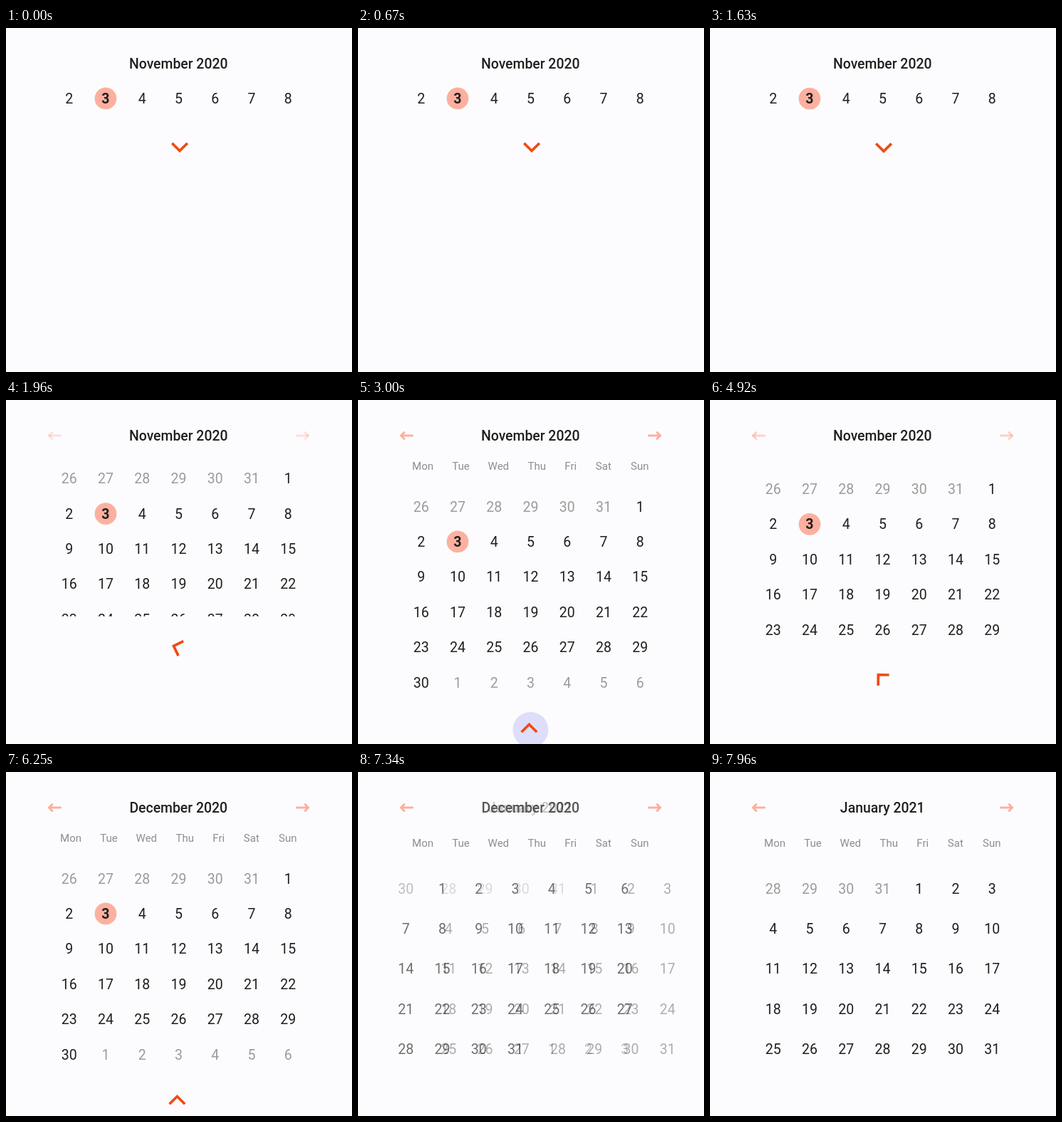
These frames come from a looping animation (486 by 483 pixels, 8 s). An HTML page with a canvas:

```html
<!DOCTYPE html>
<html lang="en">
<head>
<meta charset="utf-8">
<title>Calendar</title>
<style>
  html, body { margin: 0; width: 100%; height: 100%; overflow: hidden; background: #fcfcff; }
  canvas { display: block; }
</style>
</head>
<body>
<canvas id="stage" width="486" height="483"></canvas>
<script>
const ctx = document.getElementById('stage').getContext('2d');
const LOOP = 8000;
const INK = '#1f1f1c', MUTED = '#9b9b9b', LABEL = '#8c8c95';
const ACCENT = '#ee4b14', SOFT = '#fdb09f', RIPPLE = '#dedefb';
const FONT = 'Roboto, Arial, sans-serif';

const DAYS = [['Mon', 91], ['Tue', 144.5], ['Wed', 197.3], ['Thu', 251.3],
              ['Fri', 298.7], ['Sat', 344.8], ['Sun', 395.8]];
const NOV = { title: 'November 2020', lead: 6, before: 31, days: 30, rows: 6, top: 149.5, pitch: 49.4, today: 3 };
const DEC = { title: 'December 2020', lead: 1, before: 30, days: 31, rows: 5, top: 163.5, pitch: 56.4 };
const JAN = { title: 'January 2021', lead: 4, before: 31, days: 31, rows: 5, top: 163.5, pitch: 56.4 };

const ramp = (t, from, to) => Math.min(1, Math.max(0, (t - from) / (to - from)));
const easeOut = x => 1 - (1 - x) ** 3;

function faded(alpha, draw) {
  if (alpha <= 0) return;
  ctx.save();
  ctx.globalAlpha = alpha;
  draw();
  ctx.restore();
}

function text(str, x, baseline, size, color, weight = 400) {
  ctx.font = `${weight} ${size}px ${FONT}`;
  ctx.fillStyle = color;
  ctx.fillText(str, x, baseline);
}

function disc(x, y, r, color) {
  ctx.fillStyle = color;
  ctx.beginPath();
  ctx.arc(x, y, r, 0, 2 * Math.PI);
  ctx.fill();
}

function line(points, width, color) {
  ctx.lineWidth = width;
  ctx.strokeStyle = color;
  ctx.beginPath();
  points.forEach(([x, y]) => ctx.lineTo(x, y));
  ctx.stroke();
}

function grid(month, dx = 0, dy = 0) {
  for (let i = 0; i < month.rows * 7; i++) {
    const day = i - month.lead + 1;
    const inside = day > 0 && day <= month.days;
    const label = inside ? day : day < 1 ? day + month.before : day - month.days;
    const x = 88.7 + 51.25 * (i % 7) + dx;
    const y = month.top + month.pitch * Math.floor(i / 7) + dy;
    const today = day === month.today;
    if (today) disc(x, y, 15.4, SOFT);
    text(label, x, y + 7, 19.5, inside ? INK : MUTED, today ? 700 : 400);
  }
}

function weekdays(y) {
  for (const [name, x] of DAYS) text(name, x, y + 5.2, 15, LABEL);
}

function arrow(tip, dir) {
  ctx.lineCap = ctx.lineJoin = 'round';
  line([[tip, 50], [tip + 16 * dir, 50]], 3, SOFT);
  line([[tip + 4.3 * dir, 45.5], [tip, 50], [tip + 4.3 * dir, 54.5]], 3, SOFT);
}

function chevron(y, open) {
  ctx.translate(242.2, y);
  ctx.rotate(Math.PI * open);
  ctx.lineCap = 'butt';
  ctx.lineJoin = 'miter';
  line([[-9, -4.3], [1.8, 6.5], [12.6, -4.3]], 3.7, ACCENT);
}

function render(t) {
  const open = ramp(t, 1630, 2175) - ramp(t, 3120, 3665) + ramp(t, 4510, 5055);
  const labels = ramp(t, 2175, 2380) - ramp(t, 3090, 3190) + ramp(t, 5055, 5320);
  const toDec = ramp(t, 6430, 6510);
  const slide = ramp(t, 7270, 7790);
  const titleDec = ramp(t, 5940, 6230);
  const titleJan = ramp(t, 7270, 7560);
  const buttonY = 166 + 296 * open;

  ctx.fillStyle = '#fcfcff';
  ctx.fillRect(0, 0, 486, 483);
  ctx.textAlign = 'center';

  const title = (month, alpha) => faded(alpha, () => text(month.title, 242.2, 57, 19.4, INK, 500));
  title(NOV, 1 - titleDec);
  title(DEC, titleDec - titleJan);
  title(JAN, titleJan);

  faded(open * open, () => { arrow(60.5, 1); arrow(424.5, -1); });

  faded(labels * (1 - toDec), () => weekdays(92.5));
  faded(toDec, () => weekdays(99.5));

  // The month grid slides down while its window grows.
  faded(1 - toDec, () => {
    ctx.save();
    ctx.beginPath();
    ctx.rect(0, 75, 486, buttonY - 117);
    ctx.clip();
    grid(NOV, 0, 100 * (open - 1));
    ctx.restore();

    const press = ramp(t, 2860, 2990);
    faded(press * (1 - ramp(t, 3090, 3260)), () => disc(242.4, buttonY + 1, 25 * easeOut(press), RIPPLE));
    chevron(buttonY, open);
  });

  const shift = easeOut(slide);
  faded(toDec * (1 - shift), () => grid(DEC, -60 * shift));
  faded(shift, () => grid(JAN, 60 * (1 - shift)));
}

const start = performance.now();
function tick() {
  render((performance.now() - start) % LOOP);
  requestAnimationFrame(tick);
}
tick();
</script>
</body>
</html>
```
